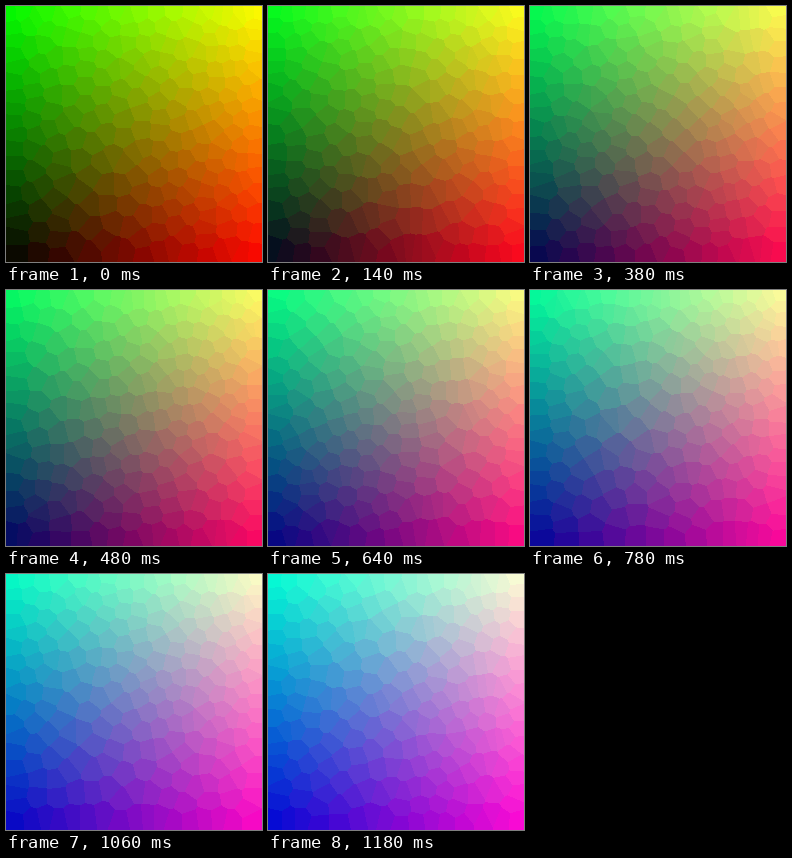
An HTML page with a canvas that plays this animation: 256x256 px, repeating every 1200 ms.

```html
<!DOCTYPE html>
<html lang="en">
<head>
<meta charset="utf-8">
<title>Colour cells</title>
<style>
  html, body { margin: 0; width: 100%; height: 100%; overflow: hidden; background: #000; }
  canvas { display: block; width: 100vw; height: 100vh; image-rendering: pixelated; }
</style>
</head>
<body>
<canvas id="stage" width="256" height="256"></canvas>
<script>
const SIZE = 256, CELLS = 256, STEPS = 60, STEP_MS = 20;
const CYCLES = 128, STRIDE = 499;
const ctx = document.getElementById('stage').getContext('2d');

// Blue level of the whole field: a sine of the step
const blueAt = step => Math.round(255 * Math.sin(step / STEPS));

// Self-organising chain of colours (NeuQuant) fitted to the gradient
function fitPalette(blue) {
  const make = fn => Float64Array.from({ length: CELLS }, (_, i) => fn(i));
  const R = make(i => i), G = make(i => i), B = make(i => i);
  const A = make(i => i < 16 ? i * 16 : 255);
  const freq = make(() => 1 / CELLS), bias = make(() => 0);
  const beta = 1 / 1024;

  function contest(r, g, b) {
    let best = 0, bestD = Infinity, pick = 0, pickD = Infinity;
    for (let i = 0; i < CELLS; i++) {
      const d = Math.abs(R[i] - r) + Math.abs(G[i] - g) + Math.abs(B[i] - b) + Math.abs(A[i] - 255);
      if (d < bestD) { bestD = d; best = i; }
      const biased = d - bias[i];
      if (biased < pickD) { pickD = biased; pick = i; }
      freq[i] -= beta * freq[i];
      bias[i] += freq[i];
    }
    freq[best] += beta;
    bias[best] -= 1;
    return pick;
  }

  function pull(i, k, r, g, b) {
    R[i] -= k * (R[i] - r);
    G[i] -= k * (G[i] - g);
    B[i] -= k * (B[i] - b);
    A[i] -= k * (A[i] - 255);
  }

  const total = SIZE * SIZE, every = total / CYCLES;
  let alpha = 1024, reach = CELLS / 8 * 64, rad = reach >> 6, pos = 0;

  for (let n = 1; n <= total; n++) {
    const r = pos % SIZE, g = 255 - Math.floor(pos / SIZE);
    const c = contest(r, g, blue), k = alpha / 1024;
    pull(c, k, r, g, blue);
    if (rad) {
      const lo = Math.max(c - rad, 0), hi = Math.min(c + rad, CELLS);
      for (let q = 0, up = c + 1, down = c - 1; up < hi || down > lo; q++) {
        const kq = k * (rad * rad - q * q) / (rad * rad);
        if (up < hi) pull(up++, kq, r, g, blue);
        if (down > lo) pull(down--, kq, r, g, blue);
      }
    }
    pos = (pos + STRIDE) % total;
    if (n % every === 0) {
      alpha -= Math.floor(alpha / 30);
      reach -= Math.floor(reach / 30);
      rad = reach >> 6;
      if (rad <= 1) rad = 0;
    }
  }
  const level = v => Math.max(0, Math.min(255, Math.round(v)));
  return Array.from(R, (r, i) => [r, G[i], B[i], A[i]].map(level));
}

// Every pixel takes the nearest colour of the palette
function render(step) {
  const blue = blueAt(step), palette = fitPalette(blue);
  const image = new ImageData(SIZE, SIZE);
  const out = new Uint32Array(image.data.buffer);
  for (let y = 0; y < SIZE; y++) {
    const near = palette.filter(c => Math.abs(c[1] - 255 + y) < 40);
    const red = near.map(c => c[0]);
    const rest = near.map(c => (c[1] - 255 + y) ** 2 + (c[2] - blue) ** 2 + (c[3] - 255) ** 2);
    const ink = near.map(c => (255 << 24 | c[2] << 16 | c[1] << 8 | c[0]) >>> 0);
    for (let x = 0; x < SIZE; x++) {
      let best = 0, bestD = Infinity;
      for (let i = 0; i < red.length; i++) {
        const dx = red[i] - x, d = dx * dx + rest[i];
        if (d < bestD) { bestD = d; best = i; }
      }
      out[y * SIZE + x] = ink[best];
    }
  }
  return image;
}

const cache = [];
const start = performance.now();
let shown = -1;

function draw() {
  const step = Math.floor((performance.now() - start) / STEP_MS) % STEPS;
  if (step !== shown) {
    ctx.putImageData(cache[step] ||= render(step), 0, 0);
    shown = step;
  }
  requestAnimationFrame(draw);
}
draw();
</script>
</body>
</html>
```
